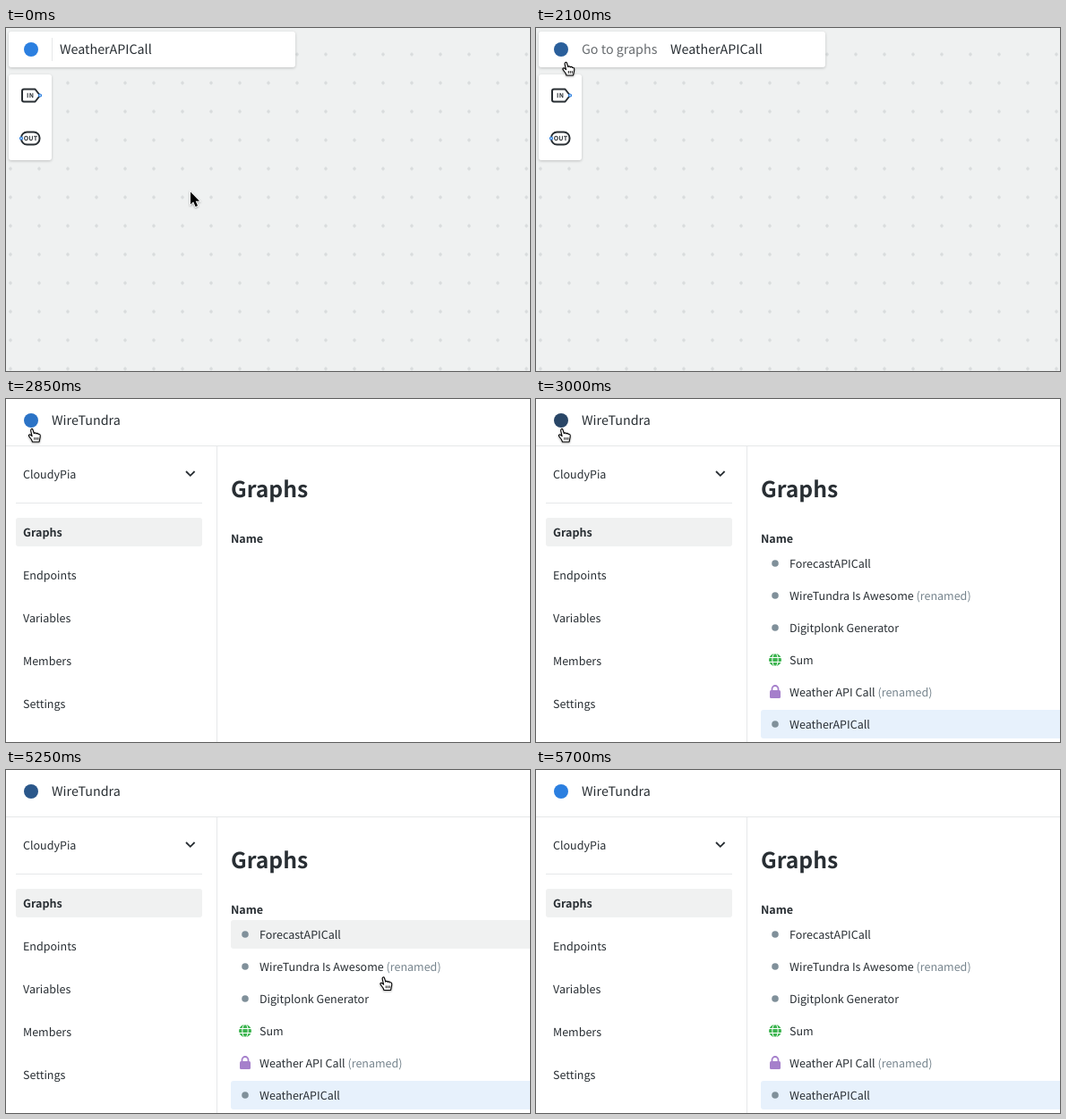
Write an HTML page that moves like this. It is 585x384 px and loops after 5720 ms.

```html
<!DOCTYPE html>
<html lang="en">
<head>
<meta charset="utf-8">
<title>Graph editor</title>
<style>
  html, body { margin: 0; width: 100%; height: 100%; overflow: hidden; background: #fff; }
  svg { display: block; }
  text {
    font: 12.53px "Noto Sans CJK JP", "Noto Sans CJK SC", "Noto Sans CJK", "Noto Sans", sans-serif;
    fill: #282e33; text-rendering: geometricPrecision; white-space: pre;
  }
  .big { font-size: 14.32px; }
  .bold { font-weight: 700; }
  .head { font-size: 24.7px; }
  .tiny { font-size: 7px; letter-spacing: .5px; text-anchor: middle; }
  .note { fill: #77858e; }
  .panel { fill: #fff; filter: drop-shadow(0 1px 1.5px #0003); }
  .icon { fill: #fff; stroke: #282e33; stroke-width: 2; stroke-linejoin: round; }
  .port { fill: #cfe3fa; stroke: #2b7fe0; stroke-width: 1.2; }
  .line { stroke: #e6e8e9; }
</style>
</head>
<body>
<svg width="585" height="384" viewBox="0 0 585 384">
  <defs>
    <pattern id="grid" x="-11" y="13.5" width="32" height="32" patternUnits="userSpaceOnUse">
      <path d="M16 13.8 18.2 16 16 18.2 13.8 16z" fill="#d8dbdc"/>
    </pattern>
  </defs>

  <g id="editor">
    <rect width="585" height="384" fill="#eff1f1"/>
    <rect width="585" height="384" fill="url(#grid)"/>
    <rect class="panel" x="3" y="4" width="320" height="40" rx="3"/>
    <rect class="panel" x="3" y="52" width="48" height="96" rx="3"/>
    <path id="divider" class="line" d="M51.5 11V37"/>
    <text id="back" class="big" x="51" y="29.3">Go to graphs</text>
    <text id="title" class="big" y="29.3">WeatherAPICall</text>
    <path class="icon" d="M20 68.5H32.5L38 75.5 32.5 82.500H20Q18 82.500 18 80.500V70.500Q18 68.500 20 68.500z"/>
    <circle class="port" cx="38" cy="75.5" r="1.5"/>
    <text class="tiny bold" x="27.3" y="78.1">IN</text>
    <rect class="icon" x="17" y="116.500" width="20.500" height="14" rx="6.500"/>
    <circle class="port" cx="17" cy="123.500" r="1.5"/>
    <text class="tiny bold" x="27.500" y="126.100" style="letter-spacing:.1px">OUT</text>
  </g>

  <g id="app">
    <rect width="585" height="384" fill="#fff"/>
    <path class="line" d="M0 52.500H585M235.500 53V384M11 116.500H219"/>
    <text class="big" x="51" y="29.3">WireTundra</text>
    <text x="19" y="89">CloudyPia</text>
    <path d="M201 81l4.800 4.800 4.800-4.800" fill="none" stroke="#282e33" stroke-width="1.800"/>
    <rect x="11" y="133" width="208" height="32" rx="3" fill="#f0f1f1"/>
    <g id="menu"></g>
    <text class="head bold" x="251" y="110">Graphs</text>
    <text class="bold" x="251" y="161">Name</text>
    <g id="list">
      <rect id="hover" x="251" y="168" width="340" height="32" rx="3" fill="#f0f1f1"/>
      <rect x="251" y="348" width="340" height="32" rx="3" fill="#e7f1fc"/>
      <g id="rows"></g>
      <g transform="translate(267 292)" fill="none" stroke="#fff">
        <circle r="7" fill="#3cb44f" stroke="none"/>
        <path d="M-7-2.500H7M-7 2.500H7"/>
        <ellipse rx="3.200" ry="7.300"/>
      </g>
      <rect x="261" y="326" width="12" height="9" rx="1.500" fill="#a57fcb"/>
      <path d="M263.500 327v-2.500a3.500 3.500 0 0 1 7 0v2.500" fill="none" stroke="#a57fcb" stroke-width="1.800"/>
    </g>
  </g>

  <circle id="logo" cx="28" cy="24" r="8"/>

  <g id="cursor" style="filter:drop-shadow(0 1px 1px #0005)">
    <path id="arrow" d="M0 0V14L3.200 11 5.600 16.500 8 15.500 5.700 10.200H10z" stroke="#fff" stroke-width="1.600" paint-order="stroke"/>
    <path id="cross" d="M-6.500 .5H6.500M.5-6V7" stroke="#000"/>
    <g id="hand" fill="#fff" stroke="#000" stroke-width="1.100" stroke-linejoin="round">
      <path d="M5 15.500 4 13C3 11.500 1.500 10 1 8.800 .5 7.600 2 7 3 7.800L4.600 9.200 3.200 3C2.900 .6 5 .2 5.500 2L6.800 6.200C7 5 9 5 9.200 6.500 9.800 5.400 11.300 5.800 11.500 7 12.500 6.300 13.600 7 13.700 8.300 14 10.500 13 12.500 12.600 15.500z"/>
      <path d="M7.300 10.500v2.800M9.300 10.500v2.800M11.300 10.500v2.800" stroke-width=".9"/>
    </g>
  </g>
</svg>
<script>
const LOOP = 5720;
const $ = id => document.getElementById(id);
const show = (id, on) => $(id).style.display = on ? '' : 'none';

$('menu').innerHTML = ['Graphs', 'Endpoints', 'Variables', 'Members', 'Settings']
  .map((name, i) => `<text x="19" y="${154 + 48 * i}"${i ? '' : ' class="bold"'}>${name}</text>`).join('');

const note = '<tspan class="note"> (renamed)</tspan>';
$('rows').innerHTML = ['ForecastAPICall', 'WireTundra Is Awesome' + note, 'Digitplonk Generator',
  'Sum', 'Weather API Call' + note, 'WeatherAPICall']
  .map((name, i) => `<text x="283" y="${189 + 36 * i}">${name}</text>` +
    (i == 3 || i == 4 ? '' : `<circle cx="267" cy="${184 + 36 * i}" r="3.800" fill="#80909a"/>`)).join('');

// start time, cursor, x, y, logo darkness
const steps = [
  [0, 'arrow', 206, 183.5, 0],
  [1500, 'cross', 180, 163, 0],
  [1650, 'cross', 107, 91, 0],
  [1800, 'cross', 68, 57, 0],
  [1950, 'arrow', 42, 42, 0],
  [2100, 'hand', 29, 37.5, .4],
  [2250, 'hand', 24.5, 32.5, .85],
  [2400, 'hand', 24.5, 32.5, 1],
  [2850, 'hand', 24.5, 32.5, .15],
  [3000, 'hand', 24.5, 32.5, .7],
  [3150, 'hand', 24.5, 32.5, 1],
  [5250, 'hand', 417, 231, .5],
  [5400, 'hand', 568, 366, .1],
  [5550, 'hand', 574.5, 377, 0],
  [5700, '', 0, 0, 0]
];

const blue = [43, 127, 224], dark = [40, 46, 51];

function draw(now) {
  const t = now % LOOP;
  const [start, cursor, x, y, mix] = steps.findLast(s => s[0] <= t);
  const open = start >= 2100;

  show('editor', start < 2850);
  show('app', start >= 2850);
  show('list', start >= 3000);
  show('hover', start == 5250);
  show('divider', !open);
  show('back', open);
  $('back').style.opacity = start == 2100 ? .7 : 1;
  $('title').setAttribute('x', !open ? 60 : start == 2100 ? 150 : 152);

  $('logo').setAttribute('fill', `rgb(${blue.map((c, i) => Math.round(c + (dark[i] - c) * mix))})`);
  for (const id of ['arrow', 'cross', 'hand']) show(id, id == cursor);
  $('cursor').setAttribute('transform', `translate(${x} ${y})`);
  requestAnimationFrame(frame);
}

let origin;
function frame(now) {
  origin ??= now;
  draw(now - origin);
}
draw(0);
</script>
</body>
</html>
```
